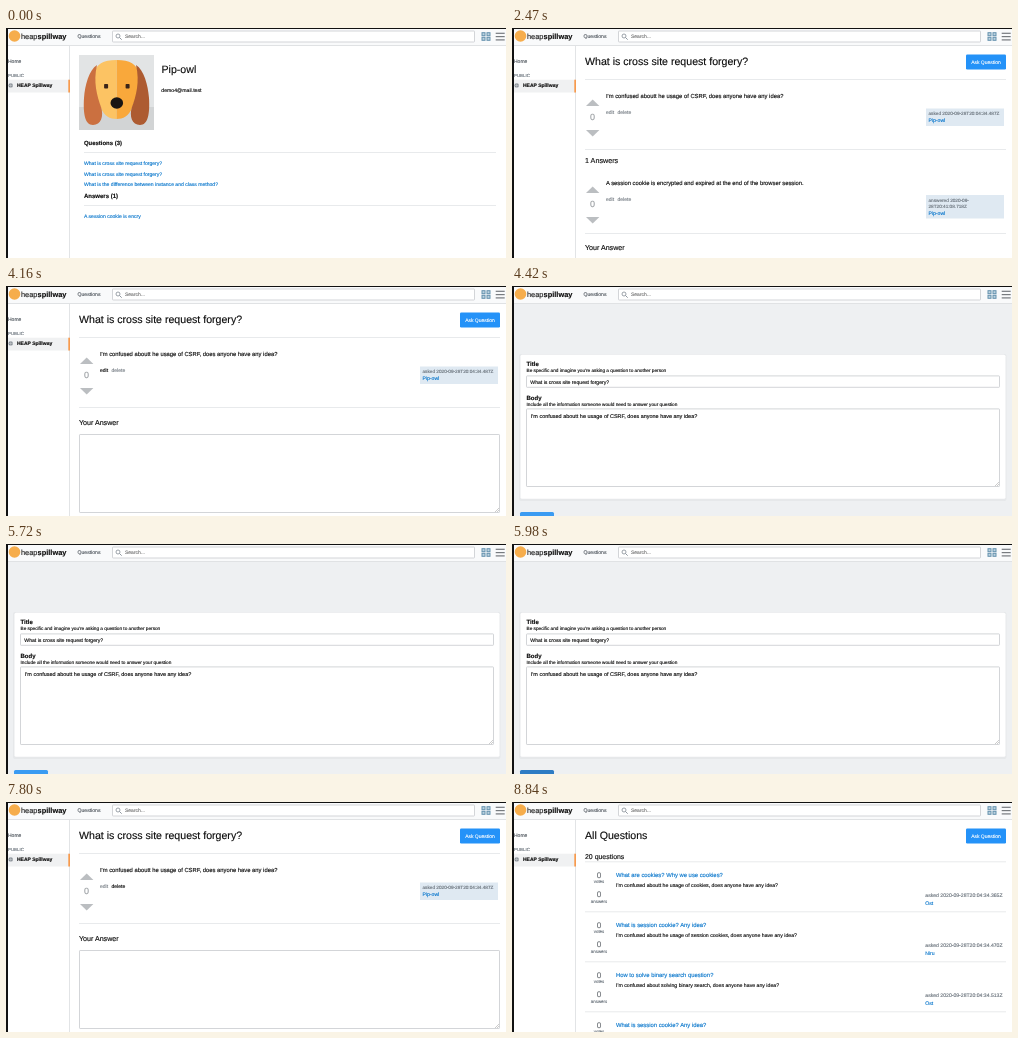
Recreate the animation shown at these times as an HTML page. Size 500 px wide and 230 px high, loop 9.36 s.

```html
<!DOCTYPE html>
<html lang="en">
<head>
<meta charset="utf-8">
<title>Question board</title>
<style>
  html, body { margin: 0; width: 100%; height: 100%; overflow: hidden; background: #fff; }
  svg { display: block; width: 100%; height: 100%; }
  text {
    font-family: "Liberation Sans", Arial, sans-serif;
    text-rendering: geometricPrecision;
    white-space: pre;
    fill: currentColor;
    stroke: currentColor;
    stroke-width: .14px;
  }
</style>
</head>
<body>
<svg id="stage" viewBox="0 0 500 230"></svg>
<script>
const LOOP = 9360;
const INK = '#0c0c0c', GREY = '#6a737c', LINK = '#0a77cc', BLUE = '#2492f8', RULE = '#e8eaec';
const USER = 'Pip-owl';
const QUESTION = 'What is cross site request forgery?';
const DETAIL = "I'm confused aboutt he usage of CSRF, does anyone have any idea?";
const stage = document.getElementById('stage');

function add(parent, tag, attrs = {}, content) {
  const el = document.createElementNS('http://www.w3.org/2000/svg', tag);
  for (const key in attrs) el.setAttribute(key, attrs[key]);
  if (content !== undefined) el.textContent = content;
  parent.append(el);
  return el;
}
const group = parent => add(parent, 'g');
const rect = (p, x, y, width, height, fill, extra) =>
  add(p, 'rect', { x, y, width, height, fill, ...extra });
const path = (p, d, fill, extra) => add(p, 'path', { d, fill, ...extra });
const label = (p, x, y, size, content, color = INK, extra) =>
  add(p, 'text', { x, y, 'font-size': size, color, ...extra }, content);
const bold = (p, x, y, size, content, color = INK) =>
  label(p, x, y, size, content, color, { 'font-weight': 700 });
const centered = (p, x, y, size, content, color) =>
  label(p, x, y, size, content, color, { 'text-anchor': 'middle' });
const rule = (p, y, from = 73, to = 494) => rect(p, from, y, to - from, 1, RULE);
const field = (p, x, y, w, h) =>
  rect(p, x + .5, y + .5, w - 1, h - 1, '#fff', { stroke: '#c8cbce', 'stroke-width': .8, rx: .6 });

// steps: [time in ms, value], held until the next step
function hold(el, prop, steps) {
  const frames = steps.map(([t, value]) => ({ [prop]: value, offset: t / LOOP, easing: 'step-end' }));
  frames.push({ [prop]: steps[steps.length - 1][1], offset: 1 });
  el.animate(frames, { duration: LOOP, iterations: Infinity });
}
function showDuring(el, ...spans) {
  const steps = spans[0][0] > 0 ? [[0, 'hidden']] : [];
  for (const [start, end] of spans) {
    steps.push([start, 'visible']);
    if (end < LOOP) steps.push([end, 'hidden']);
  }
  hold(el, 'visibility', steps);
}

function askButton(p) {
  rect(p, 454, 26.5, 40, 15, BLUE, { rx: 1.2 });
  centered(p, 474, 35.8, 5, 'Ask Question', '#fff');
}
function resizer(p, x, y) {
  path(p, `M${x - 4} ${y}l4-4M${x - 2} ${y}l2-2`, 'none', { stroke: '#999', 'stroke-width': .5 });
}

function drawSidebar(p) {
  rect(p, 63, 18, 1, 212, '#e2e4e6');
  label(p, 2, 35, 5, 'Home', '#525960');
  label(p, 2, 49.3, 4.4, 'PUBLIC', GREY);
  rect(p, 2, 51.7, 61, 12.8, '#f0f1f2');
  rect(p, 62.3, 51.7, 1.7, 12.8, '#f79a4d');
  add(p, 'circle', { cx: 4.7, cy: 57.4, r: 2.2, fill: '#858c93' });
  path(p, 'M2.5 57.4h4.4M4.7 55.2v4.4', 'none', { stroke: '#d5d8da', 'stroke-width': .5 });
  bold(p, 11, 59.3, 5, 'HEAP Spillway');
}

function drawHeader(p) {
  rect(p, 0, 1, 500, 16, '#f9fafb');
  rect(p, 0, 17, 500, 1, '#e0e2e4');
  add(p, 'circle', { cx: 8.5, cy: 8, r: 5.8, fill: '#f6ad4c' });
  label(p, 15, 10.7, 7.4, 'heap', '#222');
  bold(p, 31.6, 10.7, 7.4, 'spillway');
  label(p, 71.5, 10.2, 5.1, 'Questions', '#525960');
  field(p, 106, 2.5, 363, 12);
  add(p, 'circle', { cx: 112, cy: 8, r: 2, fill: 'none', stroke: '#838c95', 'stroke-width': .8 });
  path(p, 'M113.5 9.5l2.2 2.2', 'none', { stroke: '#838c95', 'stroke-width': .9 });
  label(p, 119, 10.1, 5, 'Search...', '#777');
  for (const x of [476, 481])
    for (const y of [4.7, 9.3])
      rect(p, x, y, 3, 3, '#bcd2df', { stroke: '#6592ae', 'stroke-width': 1 });
  for (const y of [4.7, 8, 11.3]) rect(p, 489.7, y, 9, 1.2, '#777b7f');
}

function drawDog(p) {
  rect(p, 73, 27, 75, 75, '#e2e4e5');
  rect(p, 73, 79, 75, 23, '#d2d4d5');
  path(p, 'M110.7 32C97 32 90 36 88 46C86 60 92 72 95 80C98 88 104 91 110.7 91Z', '#fcc363');
  path(p, 'M110.7 32C124 32 131 36 133 46C135 60 129 72 126 80C123 88 117 91 110.7 91Z', '#f9a83b');
  path(p, 'M91 37C83 42 79 57 78 70C77 86 79 97 87 97C95 97 98 88 95 79C91 68 87 54 91 37Z', '#cb7040');
  path(p, 'M130 37C138 42 142 57 143 70C144 86 142 97 134 97C126 97 123 88 126 79C130 68 134 54 130 37Z', '#ad5b31');
  for (const x of [98.1, 119.6]) rect(p, x, 56, 4, 4.5, '#3a2418', { rx: .8 });
  add(p, 'ellipse', { cx: 110.8, cy: 75, rx: 6.3, ry: 5.8, fill: '#191513' });
}

function drawProfile(p) {
  drawSidebar(p);
  drawDog(p);
  label(p, 155.5, 45, 10.6, USER);
  label(p, 155.3, 64, 5.17, 'demo4@mail.test');
  bold(p, 78, 116.7, 5.95, 'Questions (3)');
  rule(p, 124, 78, 490);
  [QUESTION, QUESTION, 'What is the difference between instance and class method?']
    .forEach((title, i) => label(p, 78, 136.9 + i * 10.7, 5.08, title, LINK));
  bold(p, 78, 170, 6, 'Answers (1)');
  rule(p, 177, 78, 490);
  label(p, 78, 190.4, 5.08, 'A session cookie is encry', LINK);
}

function drawPost(p, dy, body) {
  path(p, `M74 ${78 + dy}l6.7-6.5 6.7 6.5z`, '#bbbec1');
  centered(p, 80.6, 91.5 + dy, 9, '0', '#999da1');
  path(p, `M74 ${102 + dy}h13.4l-6.7 6.5z`, '#bbbec1');
  label(p, 94, 69.5 + dy, 5.84, body);
  return ['edit', 'delete'].map((action, i) =>
    label(p, 94 + i * 11.5, 85.5 + dy, 5.05, action, '#7a8188'));
}
function drawStamp(p, y, lines) {
  rect(p, 414, y, 78, lines.length * 6 + 11.5, '#dfe9f2');
  lines.forEach((line, i) => label(p, 416.5, y + 6.8 + i * 6, 4.7, line, GREY));
  label(p, 416.5, y + 7.9 + lines.length * 6, 5.1, USER, LINK);
}

function drawQuestion(p) {
  drawSidebar(p);
  label(p, 73, 37.2, 10.6, QUESTION);
  askButton(p);
  rule(p, 51);
  const [edit, del] = drawPost(p, 0, DETAIL);
  drawStamp(p, 80.5, ['asked 2020-09-28T20:04:34.487Z']);
  rule(p, 121);

  const answered = group(p);
  label(answered, 73, 135.3, 7.2, '1 Answers');
  drawPost(answered, 87, 'A session cookie is encrypted and expired at the end of the browser session.');
  drawStamp(answered, 167, ['answered 2020-09-', '28T20:41:08.718Z']);
  rule(answered, 205);
  label(answered, 73, 222, 7.1, 'Your Answer');

  const unanswered = group(p);
  label(unanswered, 73, 138.6, 7.1, 'Your Answer');
  field(unanswered, 73, 148, 421, 79);
  resizer(unanswered, 493, 226);

  showDuring(answered, [2470, 3640]);
  showDuring(unanswered, [3640, 4420], [6890, 8840]);
  hold(edit, 'color', [[0, '#7a8188'], [4030, INK], [4420, '#7a8188']]);
  hold(del, 'color', [[0, '#7a8188'], [7800, INK], [8840, '#7a8188']]);
}

function drawEditor(p) {
  rect(p, 2, 18, 498, 212, '#eef0f2');
  rect(p, 7, 68, 487.5, 147, '#e6e8ea', { rx: 2 });
  rect(p, 8.5, 68.7, 485, 144, '#fff', { rx: 1.5 });
  bold(p, 14.5, 80.2, 6, 'Title');
  label(p, 14.5, 86.4, 4.71, "Be specific and imagine you're asking a question to another person");
  field(p, 14, 89.4, 474, 12.4);
  label(p, 18.3, 97.5, 5.13, QUESTION);
  bold(p, 14.5, 113.8, 6, 'Body');
  label(p, 14.5, 119.9, 4.71, 'Include all the information someone would need to answer your question');
  field(p, 14, 122.4, 474, 78.6);
  resizer(p, 487, 200);
  label(p, 18.8, 132.2, 5.47, DETAIL);
  const save = rect(p, 8, 226, 34, 14, '#3a9bf2', { rx: 1.5 });
  hold(save, 'fill', [[0, '#3a9bf2'], [5980, '#2e7cc4']]);
}

function drawList(p) {
  drawSidebar(p);
  label(p, 73, 37, 10.6, 'All Questions');
  askButton(p);
  label(p, 73, 56.9, 6.95, '20 questions');
  const ask = topic => `I'm confused ${topic}, does anyone have any idea?`;
  [
    ['What are cookies? Why we use cookies?', ask('aboutt he usage of cookies'), '365', 'Ost'],
    ['What is session cookie? Any idea?', ask('aboutt he usage of session cookies'), '470', 'Niru'],
    ['How to solve binary search question?', ask('about solving binary search'), '513', 'Ost'],
    ['What is session cookie? Any idea?', '', '', '']
  ].forEach(([title, body, ms, author], i) => {
    const row = add(p, 'g', { transform: `translate(0 ${i * 50})` });
    rule(row, 59.3);
    ['votes', 'answers'].forEach((unit, n) => {
      centered(row, 87, 75.8 + n * 19.5, 8.2, '0', '#6a6f74');
      centered(row, 87, 81.2 + n * 19.7, 4.4, unit, GREY);
    });
    label(row, 104, 74.9, 5.87, title, LINK);
    label(row, 104, 84.5, 5.19, body);
    label(row, 413.3, 94.9, 5.12, `asked 2020-09-28T20:04:34.${ms}Z`, GREY);
    label(row, 413.3, 103, 5.1, author, LINK);
  });
}

rect(stage, 0, 0, 500, 230, '#fff');
[
  [drawProfile, [0, 2470]],
  [drawQuestion, [2470, 4420], [6890, 8840]],
  [drawEditor, [4420, 6890]],
  [drawList, [8840, LOOP]]
].forEach(([draw, ...spans]) => {
  const page = group(stage);
  draw(page);
  showDuring(page, ...spans);
});
drawHeader(group(stage));
rect(stage, 0, 0, 500, 1, '#111');
rect(stage, 0, 0, 2, 230, '#111');
</script>
</body>
</html>
```
